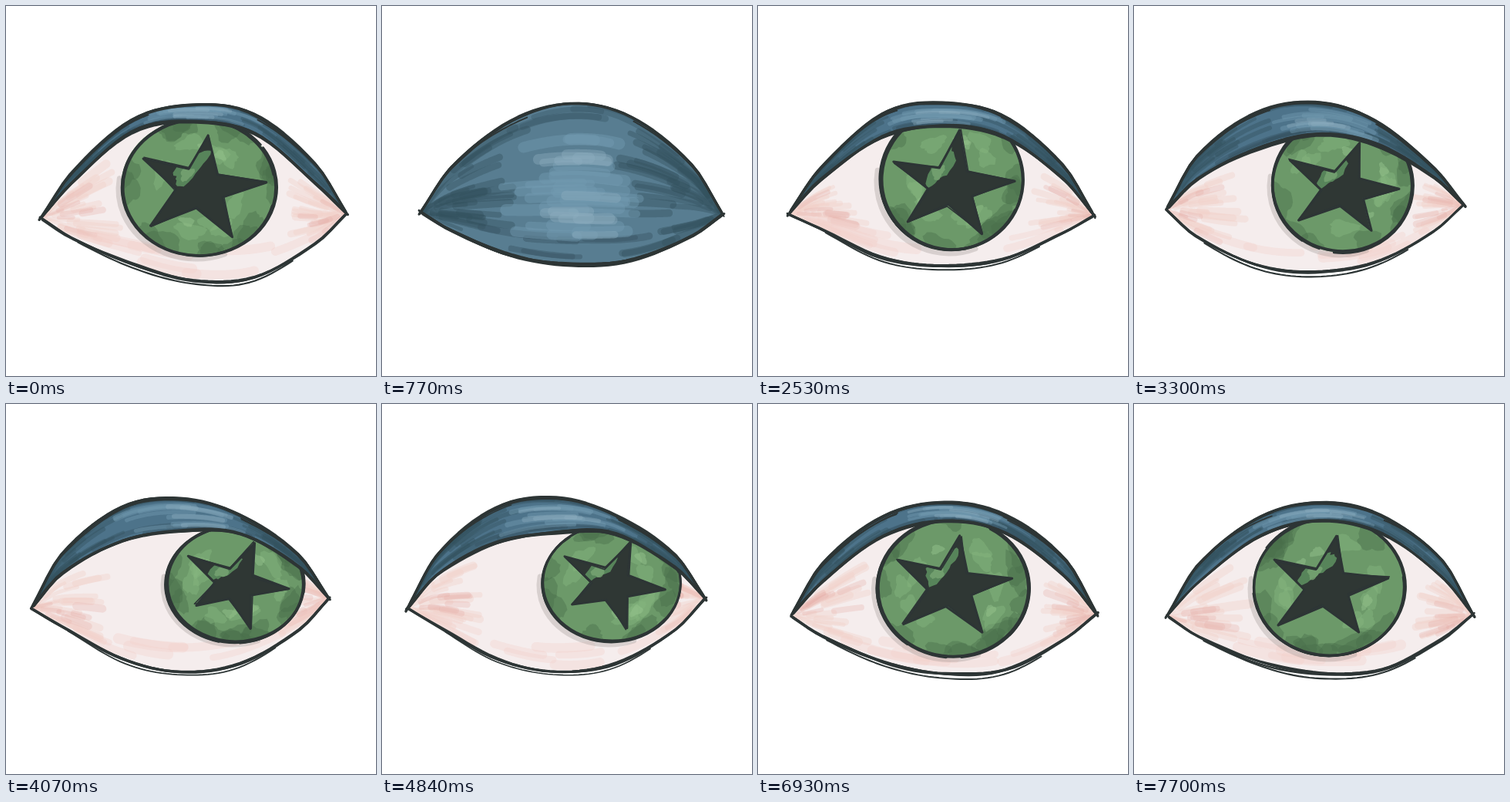
Recreate the animation shown at these times as an HTML page with a canvas. Size 480 px wide and 480 px high, loop 7.81 s.

```html
<!DOCTYPE html>
<html lang="en">
<head>
<meta charset="utf-8">
<title>Eye</title>
<style>
html, body { margin: 0; width: 100%; height: 100%; overflow: hidden; background: #fff; }
canvas { display: block; width: 100vmin; height: 100vmin; }
</style>
</head>
<body>
<canvas id="stage" width="480" height="480"></canvas>
<script>
const ctx = document.getElementById('stage').getContext('2d');
const STEP = 110, COUNT = 71;
const INK = '#2d3535';
const KNOTS = [0, .1, .3, .5, .7, .9, 1];
const TAU = Math.PI * 2;

// Corners: left x, y, right x, y. Lines: heights at the inner knots.
// Iris: centre and radii. Star: five tips relative to the iris centre.
const poses = [];
function pose(frames, corners, top, lid, low, iris, star) {
  for (const frame of frames) poses.push({ frame, parts: { corners, top, lid, low, iris, star } });
}
pose([0], [45, 275, 442, 269], [217, 147, 127, 141, 206], [230, 163, 150, 165, 231],
  [301, 335, 356, 352, 308], [250, 235, 101, 90], [12, -68, 88, -6, 43, 64, -62, 50, -72, -37]);
pose([6, 8], [50, 267, 442, 270], [210, 149, 127, 144, 207], [228, 168, 153, 167, 228],
  [291, 324, 336, 330, 298], [250, 230, 98, 92], [12, -66, 85, -2, 41, 68, -60, 52, -74, -30]);
pose([17, 25], [40, 270, 436, 272], [212, 141, 125, 142, 207], [227, 171, 155, 169, 224],
  [288, 326, 337, 329, 294], [251, 225, 94, 93], [11, -65, 81, 3, 39, 71, -57, 55, -76, -22]);
pose([30], [42, 264, 428, 258], [196, 138, 124, 148, 210], [226, 186, 167, 179, 223],
  [299, 336, 346, 333, 292], [271, 232, 92, 88], [22, -54, 72, 5, 36, 60, -57, 45, -69, -32]);
pose([33, 48], [33, 265, 419, 252], [196, 134, 122, 144, 196], [221, 180, 166, 169, 212],
  [288, 330, 347, 337, 293], [297, 233, 90, 76], [25, -53, 71, 7, 20, 59, -51, 28, -61, -35]);
pose([55, 57], [44, 267, 431, 262], [202, 133, 124, 140, 205], [224, 176, 161, 176, 224],
  [297, 338, 352, 343, 297], [245, 245, 101, 93], [5, -82, 73, -11, 35, 56, -65, 55, -77, -39]);
pose([64, 70], [43, 275, 440, 273], [209, 147, 128, 145, 203], [232, 171, 151, 167, 225],
  [301, 335, 350, 345, 305], [253, 238, 99, 90], [10, -66, 77, -12, 38, 57, -65, 48, -71, -35]);

const lerp = (a, b, k) => a + (b - a) * k;
const ease = k => k * k * (3 - 2 * k);
const clamp01 = k => Math.max(0, Math.min(1, k));
const mixLists = (a, b, k) => a.map((v, i) => lerp(v, b[i], k));

let rand;
function seed(n) {
  let s = (n + 1) * 2654435761 >>> 0;
  rand = () => {
    s = s + 0x6D2B79F5 >>> 0;
    let t = Math.imul(s ^ s >>> 15, s | 1);
    t ^= t + Math.imul(t ^ t >>> 7, t | 61);
    return ((t ^ t >>> 14) >>> 0) / 4294967296;
  };
}
const between = (a, b) => lerp(a, b, rand());

function poseAt(frame) {
  let i = 0;
  while (i < poses.length - 2 && poses[i + 1].frame <= frame) i++;
  const a = poses[i], b = poses[i + 1];
  const k = ease(clamp01((frame - a.frame) / (b.frame - a.frame)));
  const p = {};
  for (const key in a.parts) p[key] = mixLists(a.parts[key], b.parts[key], k);
  const shut = ease(clamp01((frame - 1) / 4)) * (1 - ease(clamp01((frame - 9) / 4)));
  p.lid = mixLists(p.lid, p.low, shut);
  p.shut = shut;
  return p;
}

// Smooth line through the corners and the given heights
function makeLine(corners, heights) {
  const [x0, y0, x1, y1] = corners;
  const ys = [y0, ...heights, y1], last = ys.length - 1;
  const slope = i => {
    const a = Math.max(0, i - 1), b = Math.min(last, i + 1);
    return (ys[b] - ys[a]) / (KNOTS[b] - KNOTS[a]);
  };
  return u => {
    let i = 0;
    while (i < last - 1 && u > KNOTS[i + 1]) i++;
    const h = KNOTS[i + 1] - KNOTS[i], t = (u - KNOTS[i]) / h, s = ease(t);
    const y = lerp(ys[i], ys[i + 1], s)
      + h * t * (1 - t) * ((1 - t) * slope(i) - t * slope(i + 1));
    return [lerp(x0, x1, u), y];
  };
}

function trace(line, from = 0, to = 1, wobble = 0, dy = 0, join = false) {
  const phase = between(0, TAU), waves = between(1, 3);
  for (let i = 0; i <= 40; i++) {
    const u = lerp(from, to, i / 40);
    const [x, y] = line(u);
    const yy = y + dy * Math.sin(Math.PI * clamp01(u)) + wobble * Math.sin(u * waves * TAU + phase);
    if (i || join) ctx.lineTo(x, yy); else ctx.moveTo(x, yy);
  }
}

function stroke(color, width, alpha = 1) {
  ctx.strokeStyle = color;
  ctx.lineWidth = width;
  ctx.globalAlpha = alpha;
  ctx.stroke();
  ctx.globalAlpha = 1;
}

function inkLine(line, width, spread, passes, from = 0, to = 1, dy = 0) {
  for (let i = 0; i < passes; i++) {
    ctx.beginPath();
    trace(line, from + between(-.006, .01), to + between(-.01, .006),
      spread * between(.2, .7), dy + between(-spread, spread));
    stroke(INK, width * between(.75, 1.1));
  }
}

// Brush marks lying between two lines
function brush(a, b, count, color, alpha, [u0, u1], [v0, v1], length, maxWidth) {
  for (let i = 0; i < count; i++) {
    const mid = between(u0, u1), v = between(v0, v1), half = length * between(.3, .6);
    const gap = Math.abs(b(mid)[1] - a(mid)[1]);
    const line = u => {
      const p = a(u), q = b(u);
      return [p[0], lerp(p[1], q[1], v)];
    };
    ctx.beginPath();
    trace(line, clamp01(mid - half), clamp01(mid + half), .8);
    stroke(color, Math.min(maxWidth, 3 + gap * .06) * between(.7, 1.2), alpha);
  }
}

function between2(a, b) {
  ctx.beginPath();
  trace(a);
  trace(b, 1, 0, 0, 0, true);
  ctx.closePath();
}

function blob(x, y, rx, ry, tilt, color, alpha) {
  const phase = between(0, TAU);
  ctx.beginPath();
  for (let i = 0; i < 28; i++) {
    const a = i / 28 * TAU;
    const r = 1 + .2 * Math.sin(a * 3 + phase) + between(-.1, .1);
    const px = Math.cos(a) * rx * r, py = Math.sin(a) * ry * r;
    ctx.lineTo(x + px * Math.cos(tilt) - py * Math.sin(tilt),
      y + px * Math.sin(tilt) + py * Math.cos(tilt));
  }
  ctx.globalAlpha = alpha;
  ctx.fillStyle = color;
  ctx.fill();
  ctx.globalAlpha = 1;
}

function drawWhite(lid, low) {
  between2(lid, low);
  ctx.fillStyle = '#f5eded';
  ctx.fill();
  for (const side of [[.03, .2], [.87, .98]]) {
    brush(lid, low, 20, '#f0cfc9', .4, side, [.12, .92], .13, 17);
    brush(lid, low, 7, '#e3aca6', .3, side, [.2, .9], .08, 10);
  }
  brush(lid, low, 9, '#f0cdc8', .35, [.12, .9], [.8, .96], .22, 12);
}

function drawStar(cx, cy, offsets) {
  const tips = [];
  for (let i = 0; i < 10; i += 2) tips.push([cx + offsets[i], cy + offsets[i + 1]]);
  const mx = tips.reduce((s, p) => s + p[0], 0) / 5;
  const my = tips.reduce((s, p) => s + p[1], 0) / 5;
  const shape = tips.flatMap((p, i) => {
    const q = tips[(i + 1) % 5];
    return [p, [lerp(mx, (p[0] + q[0]) / 2, .46), lerp(my, (p[1] + q[1]) / 2, .46)]];
  });
  const outline = shift => {
    ctx.beginPath();
    for (const [x, y] of shape) ctx.lineTo(x + between(-shift, shift), y + between(-shift, shift));
    ctx.closePath();
  };
  outline(0);
  ctx.fillStyle = '#2f3734';
  ctx.fill();
  ctx.save();
  ctx.clip();
  const tilt = between(-1.15, -.7);
  blob(mx - 13, my - 26, 29, 12, tilt, '#57845a', 1);
  blob(mx - 17, my - 18, 10, 7, tilt, '#78a573', .8);
  ctx.restore();
  outline(1.2);
  stroke(INK, 3);
  outline(2);
  stroke(INK, 1.5);
}

function drawIris([cx, cy, rx, ry], star) {
  const oval = (k, a0 = 0, a1 = TAU, dx = 0, dy = 0) => {
    ctx.beginPath();
    ctx.ellipse(cx + dx, cy + dy, rx * k, ry * k, 0, a0, a1);
  };
  oval(1, 1.2, 3.3, -3, 3);
  stroke('#8d8583', 7, .28);
  oval(1);
  ctx.fillStyle = '#6c9969';
  ctx.fill();
  ctx.save();
  ctx.clip();
  const patches = (count, color, alpha, r0, r1, w) => {
    for (let i = 0; i < count; i++) {
      const a = between(0, TAU), r = between(r0, r1);
      blob(cx + Math.cos(a) * rx * r, cy + Math.sin(a) * ry * r,
        between(.6, 1) * w, w * .5, a + Math.PI / 2, color, alpha);
    }
  };
  patches(18, '#476d4a', .4, .86, 1, 25);
  patches(8, '#85b57f', .45, .48, .68, 20);
  patches(3, '#97c58f', .45, .5, .62, 11);
  ctx.restore();
  drawStar(cx, cy, star);
  for (let i = 0; i < 3; i++) {
    const a = between(0, TAU);
    oval(between(.975, 1), a, a + between(4.8, 6.3), between(-1.5, 1.5), between(-1.5, 1.5));
    stroke(INK, between(2.6, 4));
  }
}

function drawLid(top, lid, shut) {
  between2(top, lid);
  ctx.save();
  ctx.clip();
  ctx.fillStyle = shut > .5 ? '#587d91' : '#4d738a';
  ctx.fill();
  const more = Math.round(shut * 16);
  brush(top, lid, 14 + more, '#34505e', .4, [.04, .26], [.05, .95], .2, 9);
  brush(top, lid, 14 + more, '#34505e', .4, [.74, .96], [.05, .95], .2, 9);
  brush(top, lid, 6, '#36515f', .4, [.3, .7], [.8, 1], .25, 8);
  brush(top, lid, 5, '#36515f', .35, [.3, .7], [0, .08], .3, 8);
  brush(top, lid, 9 + more, '#7199b0', .45, [.4, .62], [.2, .85], .23, 13);
  brush(top, lid, 4 + more / 2, '#8dacbd', .4, [.44, .6], [.25, .82], .15, 13);
  ctx.restore();
}

function draw(frame) {
  seed(frame);
  const p = poseAt(frame);
  const top = makeLine(p.corners, p.top);
  const lid = makeLine(p.corners, p.lid);
  const low = makeLine(p.corners, p.low);
  ctx.fillStyle = '#fff';
  ctx.fillRect(0, 0, 480, 480);
  ctx.lineCap = 'round';
  ctx.lineJoin = 'round';
  if (p.shut < .99) {
    ctx.save();
    between2(lid, low);
    ctx.clip();
    drawWhite(lid, low);
    drawIris(p.iris, p.star);
    ctx.restore();
  }
  drawLid(top, lid, p.shut);
  inkLine(lid, 3.4, 1.6, 3);
  inkLine(top, 3.4, 1.5, 3);
  inkLine(top, 2, 2, 2, 0, .35, 4);
  inkLine(top, 2, 2, 2, .7, 1, 4);
  inkLine(low, 3.2, 1.6, 3);
  inkLine(low, 2, 1, 1, .12, .82, 5 * (1 - p.shut));
}

let shown = -1;
const start = performance.now();
function tick() {
  const frame = Math.floor(Math.max(0, performance.now() - start) / STEP) % COUNT;
  if (frame !== shown) draw(shown = frame);
  requestAnimationFrame(tick);
}
tick();
</script>
</body>
</html>
```
